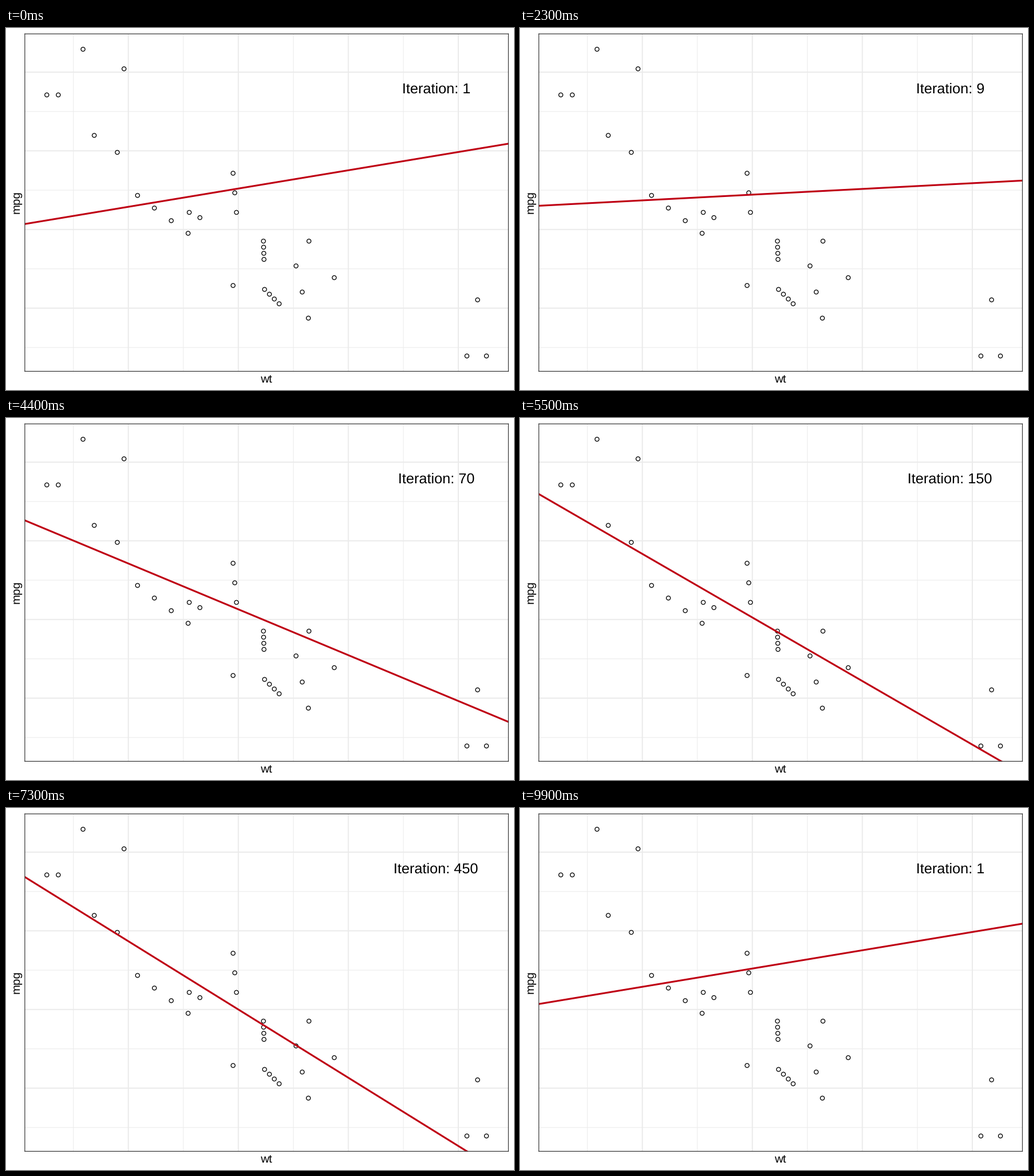
Animation, 885 px wide and 632 px high, one loop 10000 ms. Source, as a matplotlib script:

```python
import numpy as np
import matplotlib.pyplot as plt
from matplotlib.animation import FuncAnimation

W, H, DPI = 885, 632, 100
LEFT, RIGHT, TOP, BOTTOM = 32.8, 875.3, 10.3, 599.4  # panel edges in pixels

plt.rcParams.update({
    "font.family": "Liberation Sans",
    "text.hinting": "none",
    "text.hinting_factor": 8,
})


def px(size):
    """Pixels to points."""
    return size * 72 / DPI


def run(start, end, n):
    """Evenly spaced points between two ends."""
    return np.linspace(start, end, n)


def limits(v):
    pad = 0.05 * np.ptp(v)
    return v.min() - pad, v.max() + pad


# Car weight and fuel economy: lone cars, then groups along short runs
cars = np.vstack([
    [(1.513, 30.4), (1.615, 30.4), (1.835, 33.9), (2.2, 32.4),
     (1.935, 27.3), (2.14, 26), (3.17, 15.8), (3.845, 19.2),
     (4.07, 16.4), (5.25, 10.4), (5.424, 10.4), (5.345, 14.7)],
    run((2.32, 22.7), (2.77, 19.8), 4),
    run((2.78, 21.4), (2.875, 21), 2),
    run((3.17, 24.4), (3.2, 21.4), 3),
    run((3.44, 19.2), (3.445, 17.8), 4),
    run((3.45, 15.5), (3.58, 14.4), 4),
    run((3.73, 17.3), (3.84, 13.3), 3),
])
MEAN, SD = (3.217, 20.09), (0.9785, 6.027)
x, y = ((cars - MEAN) / SD).T
xlim, ylim = limits(x), limits(y)

# Gradient descent on the scaled data converges geometrically
RATE, N = 0.02, len(cars)
BEST, START_B, START_M = -0.8677, 0.5207, 0.2322


def fit(step):
    """Intercept and slope at the given iteration."""
    k = step - 1
    b = START_B * (1 - RATE) ** k
    m = BEST + (START_M - BEST) * (1 - RATE * (N - 1) / N) ** k
    return b, m


# Iterations shown, each held for two or three ticks
steps = [*range(1, 10), *range(10, 100, 10), *range(100, 1001, 50)]
hold = np.full(len(steps), 3)
hold[len(steps) // 2] = 2
hold[-10:] = 2
timeline = np.roll(np.repeat(steps, hold), -1)

fig = plt.figure(figsize=(W / DPI, H / DPI), dpi=DPI, facecolor="white")
ax = fig.add_axes([LEFT / W, 1 - BOTTOM / H, (RIGHT - LEFT) / W, (BOTTOM - TOP) / H])
ax.set(xlim=xlim, ylim=ylim, xticks=[], yticks=[])
for spine in ax.spines.values():
    spine.set(color="#333333", linewidth=px(1.2), zorder=5, snap=False)


def grid(ticks, width):
    style = dict(color="#ebebeb", lw=px(width), zorder=1, snap=False)
    for t in ticks:
        if xlim[0] < t < xlim[1]:
            ax.axvline(t, **style)
        if ylim[0] < t < ylim[1]:
            ax.axhline(t, **style)


grid(np.arange(-2.5, 3), 1)
grid(np.arange(-2, 3), 2)

ax.scatter(x, y, s=px(7.1) ** 2, facecolors="none", edgecolors="black",
           linewidths=px(1.3), zorder=2, snap=False)
line, = ax.plot([], [], color="#bf0014", lw=px(3.1), zorder=3)


def label(cx, base, text, size, **kw):
    return fig.text(cx / W, 1 - base / H, text, fontsize=px(size), color="black",
                    ha="center", va="baseline", **kw)


label(453.5, 619.6, "wt", 20.5)
label(23.3, 304.2, "mpg", 20.5, rotation=90, rotation_mode="anchor")
counter = label(749.2, 113.5, "", 25.2)

ends = np.array(xlim)


def update(i):
    step = timeline[i]
    b, m = fit(step)
    line.set_data(ends, b + m * ends)
    counter.set_text(f"Iteration: {step}")
    return line, counter


anim = FuncAnimation(fig, update, frames=len(timeline), interval=100,
                     repeat=True, repeat_delay=0)
plt.show()
```
